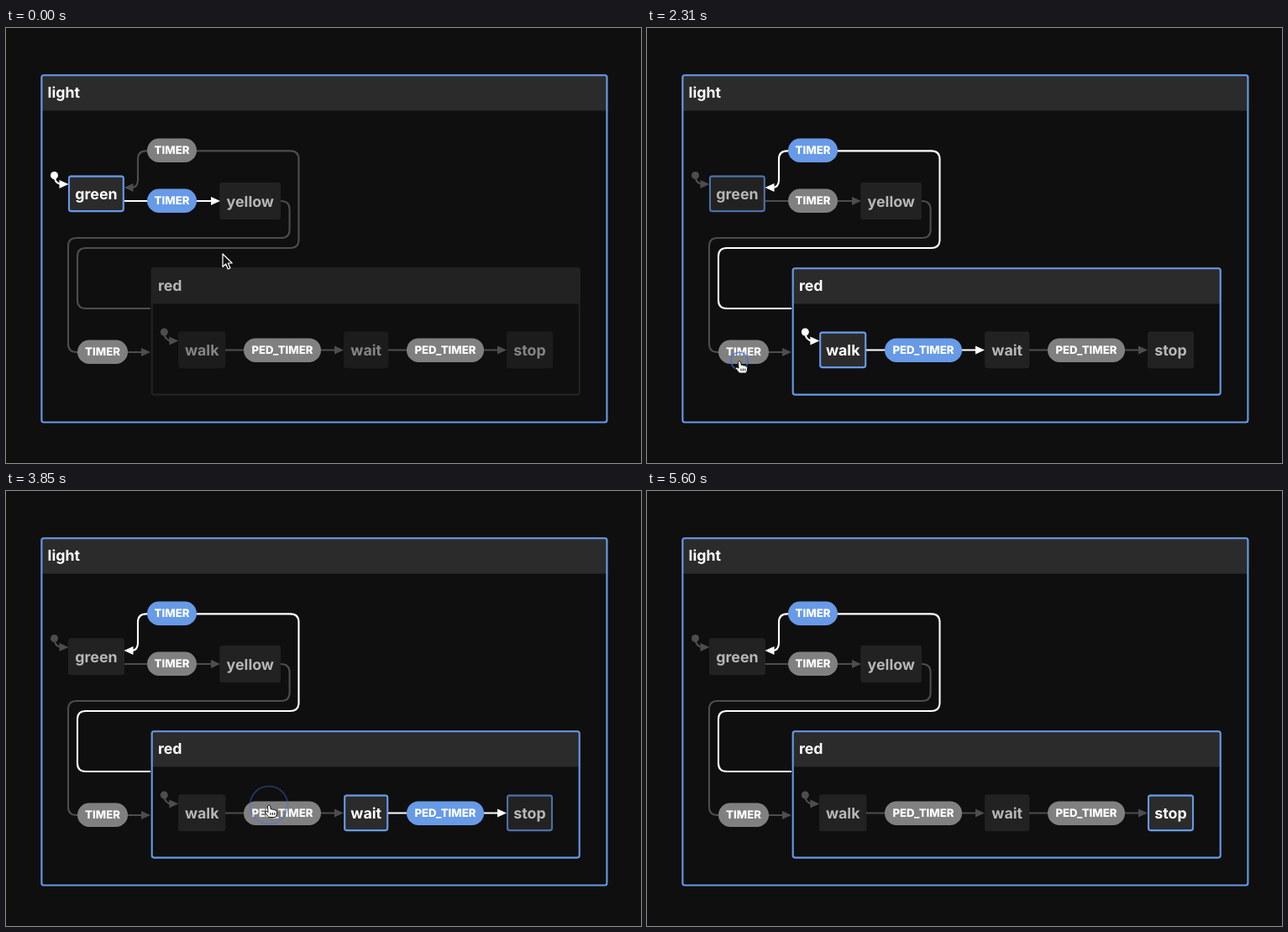
Write an HTML page that moves like this. It is 756 px wide and 518 px high and loops after 6160 ms.

```html
<!DOCTYPE html>
<html lang="en">
<head>
<meta charset="utf-8">
<title>Traffic light statechart</title>
<style>
  html, body { margin: 0; width: 100%; height: 100%; overflow: hidden; background: #0f0f0f; }
  svg { display: block; width: 756px; height: 518px; }
  text { font: 700 17.8px Inter, "Liberation Sans", sans-serif; fill: #fff; text-rendering: geometricPrecision; }
  .node { opacity: .7; }
  .node.on { opacity: 1; }
  .fill { fill: #2b2b2b; }
  .frame { fill: none; stroke: #2b2b2b; stroke-width: 2.1; }
  .on > .frame, .next > .frame { stroke: #679ae7; }
  .wire { fill: none; stroke: #4d4d4d; stroke-width: 2.1; }
  .tip { fill: #4d4d4d; }
  .pill { fill: #808080; }
  .label { font-size: 13.2px; font-weight: 800; text-anchor: middle; }
  .on > .wire { stroke: #fff; }
  .on > .tip { fill: #fff; }
  .on > .pill { fill: #679ae7; }
  #ring { fill: none; stroke: #3f6fe0; stroke-width: 1.5; }
</style>
</head>
<body>
<svg id="stage" viewBox="0 0 756 518"></svg>
<script>
const NS = 'http://www.w3.org/2000/svg';
const LOOP = 6160, TICK = 70, RIPPLE = 430;
const stage = document.getElementById('stage');

function add(parent, tag, attrs, text) {
  const el = document.createElementNS(NS, tag);
  for (const key in attrs) el.setAttribute(key, attrs[key]);
  if (text) el.textContent = text;
  return parent.appendChild(el);
}

const nodes = {};
function node(name, parent, x, y, w, h, header) {
  const g = nodes[name] = add(parent, 'g', { class: 'node' });
  add(g, 'rect', { class: 'fill', x, y, width: w, height: header || h, rx: 3 });
  add(g, 'rect', { class: 'frame', x: x + 1, y: y + 1, width: w - 2, height: h - 2, rx: 2.5 });
  const label = add(g, 'text', { x: x + w / 2, y: y + 28.6, 'text-anchor': 'middle' }, name);
  if (header) {
    label.setAttribute('x', x + 8.2);
    label.setAttribute('y', y + 27.6);
    label.setAttribute('text-anchor', 'start');
  }
  return g;
}

const arrow = (x, y, dir = 1) => `M${x} ${y}l${-11 * dir} -5v10z`;

const edges = [];
function edge(from, event, path, tip, x, y, w) {
  const g = add(stage, 'g', {});
  add(g, 'path', { class: 'wire', d: path });
  add(g, 'path', { class: 'tip', d: tip });
  add(g, 'rect', { class: 'pill', x, y, width: w, height: 28.5, rx: 14.25 });
  add(g, 'text', { class: 'label', x: x + w / 2, y: y + 18.8 }, event);
  edges.push({ g, from, event, x, y, w });
}

const starts = {};
function start(name, x, y) {
  const g = starts[name] = add(stage, 'g', {});
  add(g, 'circle', { class: 'tip', cx: x, cy: y, r: 4.5 });
  add(g, 'path', { class: 'wire', d: `M${x} ${y}q0 10 9 10.5` });
  add(g, 'path', { class: 'tip', d: arrow(x + 17, y + 10.5) });
}

const light = node('light', stage, 41.4, 55.3, 675, 415.2, 43.2);
node('green', light, 74, 175.6, 66.8, 43.5);
node('yellow', light, 254.6, 184, 72.4, 44);
const red = node('red', light, 172.7, 285.2, 511, 152.4, 43.4);
node('walk', red, 205.2, 361.6, 56, 43.5);
node('wait', red, 402.2, 361.6, 53, 43.5);
node('stop', red, 596, 361.6, 55, 43.5);

edge('red', 'TIMER',
  'M172 334H95q-10 0-10-10V272q0-10 10-10H338.5q10 0 10-10V156.4q0-10-10-10H167q-10 0-10 10V181q0 9-8 9',
  arrow(140.5, 190, -1), 168, 131.5, 59);
edge('green', 'TIMER', 'M141 206H246', arrow(255, 206), 168, 191.5, 59);
edge('yellow', 'TIMER',
  'M327 206q10.6 0 10.6 10V240q0 10-10 10H84q-10 0-10 10V376q0 10 10 10H163',
  arrow(172, 386), 85, 371.5, 60);
edge('walk', 'PED_TIMER', 'M261 383.5H393', arrow(402, 383.5), 283, 369.4, 92);
edge('wait', 'PED_TIMER', 'M455 383.5H587', arrow(596, 383.5), 477, 369.4, 92);
start('green', 57.5, 175.5);
start('walk', 188.3, 362);

const ring = add(stage, 'circle', { id: 'ring' });
const pointer = add(stage, 'path', {
  d: 'M0 0V15.5L3.7 12L6.3 18L9 16.8L6.4 11H11.2Z',
  fill: '#111', stroke: '#fff', 'stroke-width': 1.2, 'stroke-linejoin': 'round'
});
const hand = add(stage, 'path', {
  d: 'M-1.5 1q1.5-2 3 0l.8 4q1.6-1 2.6.5q1.6-.8 2.5.8q2-.4 2.2 1.5q.3 4-1.6 6.7H0q-2-2.5-4.5-5.5q-.6-2 1.8-1.5l1.7 1.2z' +
     'M2 9v3M4.4 9v3M6.8 9v3',
  fill: '#fff', stroke: '#111', 'stroke-width': 1, 'stroke-linejoin': 'round'
});

// Time, x, y of the cursor tip
const track = [
  [0, 258, 269], [70, 258, 269], [420, 203, 205.5], [1120, 203, 205.5],
  [1680, 121, 406], [2100, 110, 396.5], [2750, 110, 396.5],
  [3430, 313, 374], [3920, 313, 374], [4480, 538, 360],
  [4760, 523, 383], [5040, 523, 383], [5530, 420, 400]
];
const clicks = [[490, 'yellow'], [2240, 'walk'], [3640, 'wait'], [4830, 'stop']];
const targets = {
  green: { TIMER: ['yellow'] },
  yellow: { TIMER: ['red', 'walk'] },
  red: { TIMER: ['green'] },
  walk: { PED_TIMER: ['wait'] },
  wait: { PED_TIMER: ['stop'] }
};
const ease = p => p * p * (3 - 2 * p);

function cursorAt(t) {
  const i = track.findIndex(k => k[0] > t);
  if (i < 0) return track[track.length - 1].slice(1);
  const [t0, x0, y0] = track[i - 1], [t1, x1, y1] = track[i];
  const p = ease((t - t0) / (t1 - t0));
  return [x0 + (x1 - x0) * p, y0 + (y1 - y0) * p];
}

function render(t) {
  const last = clicks.filter(c => c[0] <= t).pop();
  const state = last ? last[1] : 'green';
  const active = ['light', state];
  if (['walk', 'wait', 'stop'].includes(state)) active.push('red');

  const [x, y] = cursorAt(t);
  const shown = t < 5600;
  const over = shown && edges.find(e => x > e.x && x < e.x + e.w && y > e.y && y < e.y + 28.5);
  const next = over ? active.flatMap(s => (targets[s] || {})[over.event] || []) : [];

  for (const name in nodes) {
    nodes[name].classList.toggle('on', active.includes(name));
    nodes[name].classList.toggle('next', next.includes(name));
  }
  for (const e of edges) e.g.classList.toggle('on', active.includes(e.from));
  for (const name in starts) starts[name].classList.toggle('on', state === name);

  for (const [el, visible] of [[pointer, !over], [hand, !!over]]) {
    el.setAttribute('transform', `translate(${x} ${y})`);
    el.setAttribute('visibility', shown && visible ? 'visible' : 'hidden');
  }

  const p = last ? Math.min((t - last[0]) / RIPPLE, 1) : 1;
  const [cx, cy] = last ? cursorAt(last[0]) : [0, 0];
  ring.setAttribute('cx', cx);
  ring.setAttribute('cy', cy);
  ring.setAttribute('r', 8 + 30 * ease(p));
  ring.setAttribute('opacity', .9 * (1 - p));
}

const origin = performance.now();
function loop() {
  const t = (performance.now() - origin) % LOOP;
  render(Math.floor(t / TICK) * TICK);
  requestAnimationFrame(loop);
}
loop();
</script>
</body>
</html>
```
